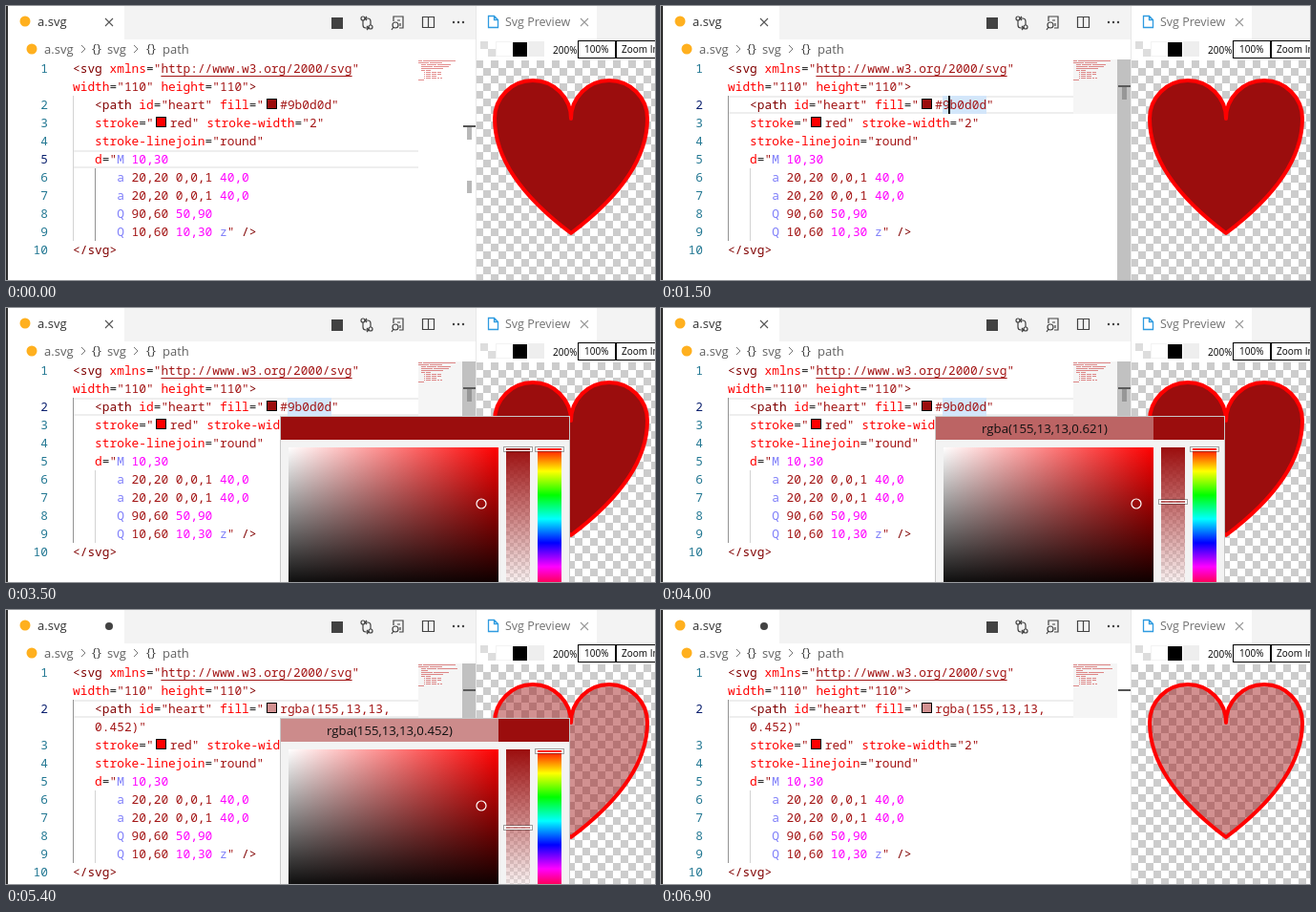
An HTML page with a canvas for the animation above (7200 ms loop, 680 by 287 pixels).

```html
<!DOCTYPE html>
<html lang="en">
<head>
<meta charset="utf-8">
<title>SVG colour picker</title>
<style>
html, body { margin: 0; width: 100%; height: 100%; overflow: hidden; background: #fff; }
canvas { display: block; }
</style>
</head>
<body>
<canvas id="stage" width="680" height="287"></canvas>
<script>
const ctx = document.getElementById('stage').getContext('2d');
const LOOP = 7200, ROW = 19, CHAR = 7.7, LEFT = 70, TOP = 56;
const CODE_FONT = '12.83px "Noto Sans Mono", monospace';
const SOLID = '#9b0d0d';
const faded = a => `rgba(155,13,13,${a})`;
const FINAL_ALPHA = 0.452;

// Code markup: "~" plus a style letter starts a token; "~c" places a swatch.
const STYLES = { t: '#800000', a: '#ff0000', k: '#222', s: '#a31515', u: '#a31515', l: '#8080fa', n: '#ff00ff' };
const attr = (name, value) => `~a${name}~k=~s"${value}"`;
const codeRows = fill => [
  [1, '~t<svg ~axmlns~k=~s"~uhttp://www.w3.org/2000/svg~s"'],
  [0, attr('width', 110) + ' ' + attr('height', 110) + '~t>'],
  ...fill.map((part, i) => i
    ? [0, '   ~s' + part]
    : [2, '   ~t<path ' + attr('id', 'heart') + ' ~afill~k=~s"~c~s' + part]),
  [3, '   ~astroke~k=~s"~c~sred" ' + attr('stroke-width', 2)],
  [4, '   ' + attr('stroke-linejoin', 'round')],
  [5, '   ~ad~k=~s"~lM ~n10,30'],
  [6, '      ~la ~s20,20 0,0,1 ~n40,0'],
  [7, '      ~la ~s20,20 0,0,1 ~n40,0'],
  [8, '      ~lQ ~s90,60 ~n50,90'],
  [9, '      ~lQ ~s10,60 ~n10,30 ~lz~s" ~t/>'],
  [10, '~t</svg>']
];
const BEFORE = codeRows(['#9b0d0d"']);
const AFTER = codeRows(['rgba(155,13,13,', '0.452)"']);

function box(x, y, w, h, fill) {
  ctx.fillStyle = fill;
  ctx.fillRect(x, y, w, h);
}
function frame(x, y, w, h, color) {
  ctx.strokeStyle = color;
  ctx.lineWidth = 1;
  ctx.strokeRect(x + .5, y + .5, w - 1, h - 1);
}
function text(str, x, y, color, font, align = 'left') {
  ctx.font = font;
  ctx.fillStyle = color;
  ctx.textAlign = align;
  ctx.fillText(str, x, y);
}
const ui = (str, x, y, color, size = 13, align) =>
  text(str, x, y, color, `${size}px "Open Sans", sans-serif`, align);
function stroke(d, color, width = 1) {
  ctx.strokeStyle = color;
  ctx.lineWidth = width;
  ctx.stroke(new Path2D(d));
}
function dot(x, y, r, color) {
  ctx.fillStyle = color;
  ctx.beginPath();
  ctx.arc(x, y, r, 0, 7);
  ctx.fill();
}
function gradient(x, y, w, h, stops, horizontal) {
  const g = horizontal ? ctx.createLinearGradient(x, 0, x + w, 0) : ctx.createLinearGradient(0, y, 0, y + h);
  stops.forEach((color, i) => g.addColorStop(i / (stops.length - 1), color));
  box(x, y, w, h, g);
}
function checker(x, y, w, h, size, color = '#ccc') {
  ctx.save();
  ctx.beginPath();
  ctx.rect(x, y, w, h);
  ctx.clip();
  box(x, y, w, h, '#fff');
  for (let r = 0; r * size < h; r++)
    for (let c = r % 2; c * size < w; c += 2)
      box(x + c * size, y + r * size, size, size, color);
  ctx.restore();
}
const cross = (x, y, color) => stroke(`M${x - 4} ${y - 4}l8 8m0-8l-8 8`, color, 1.1);

function drawSwatch(x, y, color) {
  box(x, y, 11, 11, '#000');
  box(x + 1, y + 1, 9, 9, '#fff');
  box(x + 1, y + 1, 9, 9, color);
}

function drawMinimapToken(str, col, row) {
  ctx.globalAlpha = .45;
  [...str].forEach((ch, i) => {
    if (ch !== ' ') box(432 + col + i, TOP + 1 + row * 2, 1, 1, '#c00000');
  });
  ctx.globalAlpha = 1;
}

function drawCode(rows, activeNumber, fillSwatch) {
  const swatches = [fillSwatch, '#f00'];
  rows.forEach(([number, markup], row) => {
    const y = TOP + row * ROW, baseline = y + 14;
    if (number) text(number, 44, baseline, number === activeNumber ? '#0b216f' : '#237893', CODE_FONT, 'right');
    let x = LEFT, col = 0;
    markup.split('~').forEach((token, i) => {
      const style = i ? token[0] : '', str = i ? token.slice(1) : token;
      if (style === 'c') {
        drawSwatch(Math.floor(x + 3), y + 3, swatches.shift());
        x += 17;
        return;
      }
      const color = STYLES[style] || '#222';
      text(str, x, baseline, color, CODE_FONT);
      if (style === 'u') box(x, baseline + 3, str.length * CHAR, 1, color);
      drawMinimapToken(str, col, row);
      x += str.length * CHAR;
      col += str.length;
    });
  });
}

function scrollbarOpacity(t) {
  if (t < 500 || t >= 6900) return 0;
  return t < 600 || t >= 6700 ? .5 : 1;
}

function drawEditor(t) {
  const edited = t >= 4500, clicked = t >= 1300;
  const activeRow = clicked ? 2 : 5, shift = edited ? ROW : 0;
  const wordMarked = t >= 1500 && !edited;

  // Current line, indent guides, word highlight
  const lineTop = TOP + activeRow * ROW;
  box(LEFT, lineTop, 362, 2, '#eee');
  box(LEFT, lineTop + ROW - 2, 362, 2, '#eee');
  box(70, 94, 1, 152 + shift, clicked ? '#939393' : '#d3d3d3');
  box(93, 170 + shift, 1, 76, clicked ? '#d3d3d3' : '#939393');
  if (wordMarked) box(295, 94, 46, ROW, '#d3e6fa');
  if (t >= 500) box(432, TOP, 46, 57, '#f5f5f5');

  drawCode(edited ? AFTER : BEFORE, activeRow, t >= 5400 ? faded(FINAL_ALPHA) : SOLID);

  const caret = (t >= 1300 && t < 1700) || (t >= 2100 && t < 2600) || (t >= 3100 && t < 3500);
  if (caret) box(301, 94, 2, ROW, '#000');

  // Overview ruler with the scrollbar over it
  const markTop = clicked ? 83 : 125;
  if (!clicked || wordMarked) box(483, markTop + 2, 5, 13, '#b8b8b8');
  if (!clicked) box(483, 183, 5, 13, '#b8b8b8');
  box(479, markTop, 13, 2, '#555');
  box(478, TOP, 14, 231, `rgba(100,100,100,${.4 * scrollbarOpacity(t)})`);
}

function drawEditorChrome(edited) {
  box(2, 0, 490, 35, '#f3f3f3');
  box(2, 0, 122, 35, '#fff');
  dot(20, 16, 5.5, '#ffb01f');
  ui('a.svg', 33, 21, '#333');
  if (edited) dot(108, 17, 4, '#424242');
  else cross(108, 17, '#555');

  // Toolbar
  box(341, 12, 12, 12, '#424242');
  stroke('M374 15v5q0 3 3 3h3m-2-2l2 2l-2 2M382 20v-4q0-3-3-3h-3m2-2l-2 2l2 2', '#424242', 1.2);
  stroke('M372 13a2 2 0 1 0 4 0a2 2 0 1 0-4 0M380 22a2 2 0 1 0 4 0a2 2 0 1 0-4 0', '#424242', 1.2);
  stroke('M406 16v-5h10v12h-4M405 20a3 3 0 1 0 6 0a3 3 0 1 0-6 0M406 22l-2 3M410 15h3M413 18v3', '#424242', 1.2);
  stroke('M436.5 11.5h12v11h-12zM442.5 11.5v11', '#424242', 1.2);
  [469, 474, 479].forEach(x => dot(x, 17, 1.2, '#424242'));

  // Breadcrumbs
  dot(27, 45, 5.5, '#ffb01f');
  ui('a.svg', 40, 50, '#616161');
  stroke('M79 41l4 4l-4 4M134 41l4 4l-4 4', '#777');
  ui('{}', 90, 49, '#424242');
  ui('svg', 106, 50, '#616161');
  ui('{}', 147, 49, '#424242');
  ui('path', 164, 50, '#616161');
}

const HEART = new Path2D('M10,30a20,20 0,0,1 40,0a20,20 0,0,1 40,0Q90,60 50,90Q10,60 10,30z');

function drawPreview(edited) {
  box(492, 0, 188, 57, '#fff');
  box(619, 0, 61, 35, '#f3f3f3');
  stroke('M505.5 10.5h6l4 4v8h-10zM511.5 10.5v4h4', '#2f9be0', 1.3);
  ui('Svg Preview', 523, 21, '#717171', 12.5);
  cross(606, 17, '#999');

  checker(497, 37, 16, 16, 8, '#ddd');
  frame(513, 37, 17, 16, '#f2f2f2');
  box(531, 38, 15, 15, '#000');
  box(547, 37, 17, 16, '#eee');
  ui('200%', 573, 50, '#000', 10);
  frame(599, 36, 40, 19, '#000');
  ui('100%', 606, 49, '#000', 10);
  frame(639, 36, 60, 19, '#000');
  ui('Zoom In', 645, 49, '#000', 10);

  checker(492, 57, 188, 230, 8);
  box(492, 0, 1, 287, '#e7e7e7');
  ctx.save();
  ctx.translate(492, 58);
  ctx.scale(2, 2);
  ctx.fillStyle = edited ? faded(FINAL_ALPHA) : SOLID;
  ctx.fill(HEART);
  ctx.strokeStyle = '#f00';
  ctx.lineWidth = 2;
  ctx.lineJoin = 'round';
  ctx.stroke(HEART);
  ctx.restore();
}

function slider(x, y) {
  frame(x - 1, y - 1, 31, 6, 'rgba(0,0,0,.35)');
  frame(x, y, 29, 4, '#fff');
}

function drawPicker(alpha) {
  const top = 146, height = 150;
  box(287, 113, 304, 180, '#f3f3f3');
  frame(287, 113, 304, 180, '#c8c8c8');
  box(288, 114, 228, 24, faded(alpha));
  box(516, 114, 74, 24, SOLID);
  if (alpha < 1) ui(`rgba(155,13,13,${+alpha.toFixed(3)})`, 402, 131, '#111', 13.2, 'center');

  gradient(296, top, 220, height, ['#fff', '#f00'], true);
  gradient(296, top, 220, height, ['rgba(0,0,0,0)', '#000']);
  ctx.strokeStyle = '#fff';
  ctx.lineWidth = 1.2;
  ctx.beginPath();
  ctx.arc(498, 205, 5, 0, 7);
  ctx.stroke();

  checker(524, top, 25, height, 4, '#e4e4e4');
  gradient(524, top, 25, height, [SOLID, faded(0)]);
  gradient(557, top, 25, height, ['#f00', '#ff0', '#0f0', '#0ff', '#00f', '#f0f', '#f00']);
  slider(522, Math.round(top + (1 - alpha) * (height - 4)));
  slider(555, top);
}

// The opacity slider moves in steps of 100 ms.
function pickerAlpha(t) {
  const p = Math.min(1, Math.max(0, (Math.floor(t / 100) * 100 - 3500) / 800));
  return 1 - (1 - FINAL_ALPHA) * (1 - (1 - p) ** 1.2);
}

function draw(now) {
  const t = now % LOOP, edited = t >= 4500;
  box(0, 0, 680, 287, '#fff');
  drawEditor(t);
  drawEditorChrome(edited);
  drawPreview(edited);
  box(0, 0, 2, 287, '#2c2c2c');
  if (t >= 1600 && t < 5900) {
    ctx.globalAlpha = t < 1700 ? .5 : 1;
    drawPicker(pickerAlpha(t));
    ctx.globalAlpha = 1;
  }
}

const start = performance.now();
function tick() {
  draw(performance.now() - start);
  requestAnimationFrame(tick);
}
tick();
</script>
</body>
</html>
```
